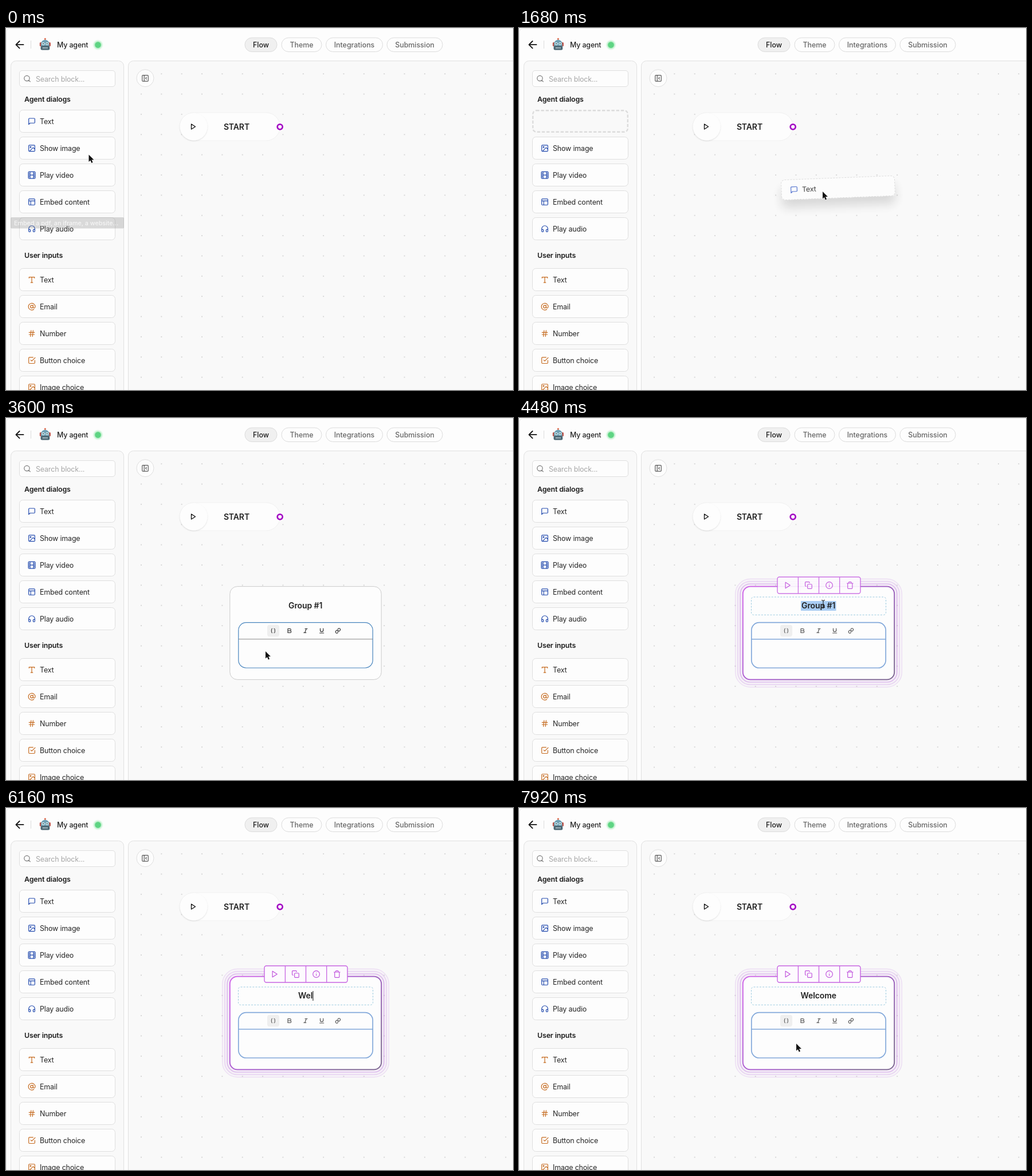
An HTML page that plays this animation: 885x633 px, repeating every 8000 ms.

```html
<!DOCTYPE html>
<html lang="en">
<head>
<meta charset="utf-8">
<title>Flow builder</title>
<style>
html, body { margin: 0; width: 100%; height: 100%; overflow: hidden; background: #fdfdfd; }
svg { display: block; width: 100%; height: 100%; font-family: Inter, "Liberation Sans", sans-serif; }
text { white-space: pre; }
.label { font-size: 12.4px; letter-spacing: -.13px; fill: #252525; }
.head { font-size: 12.4px; letter-spacing: -.13px; font-weight: 600; fill: #1c1c1c; }
.tab { font-size: 12.4px; font-weight: 500; text-anchor: middle; }
.title { font-size: 14px; letter-spacing: -.1px; font-weight: 600; text-anchor: middle; fill: #222; }
.icon { fill: none; stroke-linecap: round; stroke-linejoin: round; }
.panel { fill: #f9f9f9; stroke: #e1e1e1; }
.box { fill: #fdfdfd; stroke: #dfdfdf; }
</style>
</head>
<body>
<svg id="stage" viewBox="0 0 885 633" preserveAspectRatio="xMinYMin meet">
  <defs>
    <pattern id="dots" x="218.3" y="62.4" width="35.35" height="35.37" patternUnits="userSpaceOnUse">
      <circle cx="17.7" cy="17.7" r=".85" fill="#bcbcbc"/>
    </pattern>
    <linearGradient id="edge" x1="0" y1="0" x2="1" y2=".7">
      <stop offset="0" stop-color="#cf5fe8"/>
      <stop offset=".55" stop-color="#a558cc"/>
      <stop offset="1" stop-color="#79628f"/>
    </linearGradient>
    <filter id="lift" x="-20%" y="-60%" width="140%" height="300%">
      <feDropShadow dx="0" dy="14" stdDeviation="9" flood-color="#000" flood-opacity=".15"/>
    </filter>
    <filter id="soft" x="-20%" y="-20%" width="140%" height="140%">
      <feDropShadow dx="0" dy="1" stdDeviation="1" flood-color="#000" flood-opacity=".14"/>
    </filter>
    <filter id="blur" x="-50%" y="-50%" width="200%" height="200%"><feGaussianBlur stdDeviation="1.2"/></filter>
  </defs>

  <rect width="885" height="633" fill="#fdfdfd"/>
  <rect x=".5" y=".5" width="900" height="650" rx="7" fill="none" stroke="#ebebeb"/>

  <g id="header">
    <path class="icon" d="M30.5 29.2H17.5M23.6 23l-6.2 6.2 6.2 6.2" stroke="#111" stroke-width="1.8"/>
    <path d="M43.5 22v14" stroke="#dedede"/>
    <g id="robot">
      <path d="M68.3 21v-2" stroke="#77858e" stroke-width="1.5"/>
      <circle cx="68.3" cy="19" r="1.6" fill="#e26a4c"/>
      <rect x="58.8" y="25" width="3.4" height="7" rx="1.5" fill="#bf5148"/>
      <rect x="74.5" y="25" width="3.4" height="7" rx="1.5" fill="#bf5148"/>
      <path d="M61 28a7.3 7.3 0 0 1 14.6 0v6H61z" fill="#6f9fb3"/>
      <rect x="60.5" y="31" width="15.7" height="7.5" rx="2.5" fill="#4b6774"/>
      <circle cx="65" cy="27.5" r="2.5" fill="#d8f1f5"/>
      <circle cx="71.7" cy="27.5" r="2.5" fill="#d8f1f5"/>
      <circle cx="65" cy="27.5" r="1.1" fill="#27424d"/>
      <circle cx="71.7" cy="27.5" r="1.1" fill="#27424d"/>
      <path d="M64 34.8h8.6" stroke="#c9d8dd" stroke-width="2" stroke-dasharray="1.6 .7"/>
    </g>
    <text class="label" x="89" y="33.8" font-weight="500">My agent</text>
    <circle cx="160.5" cy="29.6" r="7.6" fill="#b9f0c8" filter="url(#blur)"/>
    <circle cx="160.5" cy="29.6" r="5.3" fill="#5ed483"/>
  </g>

  <rect class="panel" x="213.5" y="57.5" width="700" height="620" rx="9"/>
  <rect x="218.3" y="62.4" width="667" height="571" fill="url(#dots)"/>
  <circle class="box" cx="243" cy="87.7" r="15"/>
  <g id="start">
    <rect x="303.5" y="148" width="175" height="49" rx="24.5" fill="#fdfdfd" stroke="#f1f1f1"/>
    <circle cx="327.5" cy="172.5" r="24" fill="#fdfdfd" filter="url(#soft)"/>
    <text class="title" x="402.5" y="177.9">START</text>
    <circle cx="478.2" cy="172.8" r="7.3" fill="#fdfdfd"/>
    <circle cx="478.2" cy="172.8" r="4.5" fill="#fdfdfd" stroke="#a410c4" stroke-width="2.8"/>
  </g>

  <rect class="panel" x="8.5" y="57.5" width="197" height="620" rx="9"/>
  <rect class="box" x="23.5" y="74.5" width="167" height="28" rx="4.5"/>
  <text class="label" x="52" y="93.6" style="fill:#a6a6a6">Search block...</text>
  <text class="head" x="32" y="129.3">Agent dialogs</text>
  <text class="head" x="32" y="402.2">User inputs</text>
  <g id="blocks"></g>
  <rect id="slot" x="24.2" y="144.2" width="165.6" height="37.6" rx="6" fill="#f9f9f9" stroke="#dcdcdc" stroke-width="2.4" stroke-dasharray="5.4 2.8"/>
  <g id="tip">
    <rect x="8" y="331" width="198" height="19.5" rx="2" fill="#777" opacity=".27"/>
    <text x="14" y="345" font-size="10.7" font-weight="500" fill="#fff" opacity=".75">Embed a pdf, an iframe, a website...</text>
  </g>

  <g id="card">
    <g id="rings" fill="none"></g>
    <rect id="frame" x="390.8" y="294.6" width="264.4" height="162.8" rx="13" fill="#fdfdfd"/>
    <rect id="field" x="405.5" y="313" width="235" height="31.3" rx="4" fill="none" stroke="#9ccbe0" stroke-dasharray="3 2.2"/>
    <rect id="pick" x="492" y="320" width="61.5" height="17" fill="#a9cdf4"/>
    <text id="name" class="title" x="522.7" y="333.3"></text>
    <path id="caret" stroke="#222" stroke-width="1.1"/>
    <rect id="editor" x="405.8" y="357.6" width="234.4" height="79.4" rx="13.5" fill="#fdfdfd"/>
    <path id="rule" d="M406 386.7H640"/>
    <rect x="456" y="361.8" width="21" height="20.4" rx="4" fill="#efefef"/>
    <g id="format"></g>
    <g id="tools">
      <rect x="451" y="276" width="145" height="29" rx="3.5" fill="#fdfafe" stroke="#c765e2" stroke-width="1.4"/>
      <path d="M487.4 276v29M523.5 276v29M559.7 276v29" stroke="#c765e2" stroke-width="1.3"/>
    </g>
  </g>

  <g id="ghost" opacity=".88">
    <g transform="rotate(-2.2 122 160.5)">
      <rect x="23" y="143" width="198" height="35" rx="6" fill="#fdfdfd" filter="url(#lift)"/>
      <rect x="23" y="143" width="198" height="35" rx="6" fill="none" stroke="#dadada" stroke-dasharray="3 2"/>
      <text class="label" x="59" y="165.2">Text</text>
    </g>
  </g>

  <path id="arrow" d="M0 0V12.6L2.9 9.9 4.8 14.4 7 13.5 5.1 9.1H9Z" fill="#111" stroke="#fff" stroke-width="1.1" paint-order="stroke"/>
  <path id="beam" d="M-3-6.5q3 0 3 2.2V4.3q0 2.2-3 2.2M3-6.5q-3 0-3 2.2M0 4.3q0 2.2 3 2.2M-1.5 2.5h3" fill="none" stroke="#222" stroke-width="1.1"/>
</svg>
<script>
const $ = id => document.getElementById(id);
const LOOP = 8000, STEP = 80;

const square = 'M5 3h14a2 2 0 0 1 2 2v14a2 2 0 0 1-2 2H5a2 2 0 0 1-2-2V5a2 2 0 0 1 2-2z';
const ring = (x, y, r) => `M${x - r} ${y}a${r} ${r} 0 1 0 ${2 * r} 0a${r} ${r} 0 1 0 ${-2 * r} 0`;
const ICONS = {
  message: 'M21 15a2 2 0 0 1-2 2H7l-4 4V5a2 2 0 0 1 2-2h14a2 2 0 0 1 2 2z',
  image: square + ring(8.5, 8.5, 1.5) + 'M21 15l-5-5L5 21',
  film: 'M4 2h16a2 2 0 0 1 2 2v16a2 2 0 0 1-2 2H4a2 2 0 0 1-2-2V4a2 2 0 0 1 2-2zM7 2v20M17 2v20M2 12h20M2 7h5M2 17h5M17 17h5M17 7h5',
  layout: square + 'M3 9h18M9 21V9',
  audio: 'M3 18v-6a9 9 0 0 1 18 0v6M21 19a2 2 0 0 1-2 2h-1a2 2 0 0 1-2-2v-3a2 2 0 0 1 2-2h3zM3 19a2 2 0 0 0 2 2h1a2 2 0 0 0 2-2v-3a2 2 0 0 0-2-2H3z',
  type: 'M4 7V4h16v3M9 20h6M12 4v16',
  at: ring(12, 12, 4) + 'M16 8v5a3 3 0 0 0 6 0v-1a10 10 0 1 0-3.9 7.9',
  hash: 'M4 9h16M4 15h16M10 3L8 21M16 3l-2 18',
  check: 'M9 11l3 3L22 4M21 12v7a2 2 0 0 1-2 2H5a2 2 0 0 1-2-2V5a2 2 0 0 1 2-2h11',
  search: ring(11, 11, 8) + 'M21 21l-4.3-4.3',
  collapse: square + 'M9 3v18M16 9l-3 3 3 3',
  play: 'M5 3l14 9-14 9z',
  copy: 'M11 9h9a2 2 0 0 1 2 2v9a2 2 0 0 1-2 2h-9a2 2 0 0 1-2-2v-9a2 2 0 0 1 2-2zM5 15H4a2 2 0 0 1-2-2V4a2 2 0 0 1 2-2h9a2 2 0 0 1 2 2v1',
  info: ring(12, 12, 10) + 'M12 16v-4M12 8h.01',
  trash: 'M3 6h18M19 6v14a2 2 0 0 1-2 2H7a2 2 0 0 1-2-2V6M8 6V4a2 2 0 0 1 2-2h4a2 2 0 0 1 2 2v2',
  braces: 'M8 3H7a2 2 0 0 0-2 2v5a2 2 0 0 1-2 2 2 2 0 0 1 2 2v5a2 2 0 0 0 2 2h1M16 21h1a2 2 0 0 0 2-2v-5a2 2 0 0 1 2-2 2 2 0 0 1-2-2V5a2 2 0 0 0-2-2h-1',
  bold: 'M6 4h8a4 4 0 0 1 0 8H6zM6 12h9a4 4 0 0 1 0 8H6z',
  italic: 'M19 4h-9M14 20H5M15 4L9 20',
  underline: 'M6 3v7a6 6 0 0 0 12 0V3M4 21h16',
  link: 'M10 13a5 5 0 0 0 7.5.5l3-3a5 5 0 0 0-7-7l-1.7 1.7M14 11a5 5 0 0 0-7.5-.5l-3 3a5 5 0 0 0 7 7l1.7-1.7'
};

const add = (parent, markup) => parent.insertAdjacentHTML('beforeend', markup);
const icon = (name, x, y, size, color, weight = 2) =>
  `<path class="icon" d="${ICONS[name]}" stroke="${color}" stroke-width="${weight}" transform="translate(${x - size / 2} ${y - size / 2}) scale(${size / 24})"/>`;

function addBlocks(top, color, rows) {
  rows.forEach(([name, label], i) => {
    const y = top + i * 46.95;
    add($('blocks'), `<g><rect class="box" x="23.5" y="${Math.round(y - 20) + .5}" width="167" height="39" rx="6"/>
      ${icon(name, 45, y + .3, 14.2, color)}<text class="label" x="59" y="${y + 4.7}">${label}</text></g>`);
  });
}

const BLUE = '#2149ad', ORANGE = '#c56a1e', PINK = '#bf4fdc';
addBlocks(163, BLUE, [['message', 'Text'], ['image', 'Show image'], ['film', 'Play video'],
  ['layout', 'Embed content'], ['audio', 'Play audio']]);
addBlocks(440, ORANGE, [['type', 'Text'], ['at', 'Email'], ['hash', 'Number'],
  ['check', 'Button choice'], ['image', 'Image choice']]);

[['Flow', 445, 56], ['Theme', 516, 70], ['Integrations', 608, 99], ['Submission', 713.5, 97]].forEach(([label, x, w], i) =>
  add($('header'), `<rect x="${x - w / 2}" y="17" width="${w}" height="24.5" rx="12.2" fill="${i ? '#fdfdfd' : '#f0f0f0'}" stroke="#dcdcdc"/>
    <text class="tab" x="${x}" y="33.8" fill="${i ? '#666' : '#1c1c1c'}">${label}</text>`));

add($('stage').querySelector('#start'), icon('play', 327, 172.5, 12, '#111', 2.6) + icon('collapse', 243, 87.8, 14, '#555'));
add($('blocks'), icon('search', 37, 88.6, 14, '#777'));
add($('ghost').firstElementChild, icon('message', 45, 161, 14.2, '#3a5fc8'));
['braces', 'bold', 'italic', 'underline', 'link'].forEach((name, i) =>
  add($('format'), icon(name, 466.4 + i * 28.25, 372, i ? 10.6 : 9.6, 'currentColor', 2.5)));
['play', 'copy', 'info', 'trash'].forEach((name, i) =>
  add($('tools'), icon(name, 469.2 + i * 36.2, 290.5, 14, PINK)));
[[4.6, .5], [9, .28], [13.2, .2]].forEach(([d, alpha]) =>
  add($('rings'), `<rect x="${390.8 - d}" y="${294.6 - d}" width="${264.4 + 2 * d}" height="${162.8 + 2 * d}" rx="${13 + d}" stroke="#b56bdc" stroke-opacity="${alpha}" stroke-width="1.2" fill="#b56bdc" fill-opacity=".035"/>`));

// Key points: time, x, y
const POINTER = [[0, 144.5, 221.5], [480, 104, 162], [720, 104, 162], [880, 121, 161], [1680, 530, 286],
  [2160, 464, 316], [2720, 450, 390], [3200, 453, 408], [3680, 453, 408], [4160, 531, 325],
  [7200, 531, 325], [7840, 484, 412], [8000, 484, 412]];
const DRAG = [[720, 0, 0], [880, 18, 1.7], [1680, 435, 119], [2160, 368, 152]];
const GRAB = 720, DROP = 2240, FOCUS = 4240;
const KEYS = [5680, 5840, 6080, 6400, 6560, 6720, 6880];

function along(keys, t) {
  let i = 1;
  while (i < keys.length - 1 && t > keys[i][0]) i++;
  const [t0, x0, y0] = keys[i - 1], [t1, x1, y1] = keys[i];
  const p = Math.min(1, Math.max(0, (t - t0) / (t1 - t0)));
  const e = p * p * (3 - 2 * p);
  return [x0 + (x1 - x0) * e, y0 + (y1 - y0) * e];
}

const show = (el, on) => el.setAttribute('display', on ? 'inline' : 'none');
const place = (el, [x, y]) => el.setAttribute('transform', `translate(${x} ${y})`);
const paint = (el, color, width) => {
  el.setAttribute('stroke', color);
  el.setAttribute('stroke-width', width);
};

function draw(t) {
  const dragging = t >= GRAB && t < DROP;
  const focused = t >= FOCUS;
  const typed = KEYS.filter(k => t >= k).length;
  const pos = along(POINTER, t);

  $('tip').setAttribute('opacity', Math.max(0, 1 - t / 160));
  show($('blocks').firstElementChild, !dragging);
  show($('slot'), dragging);
  show($('ghost'), dragging);
  place($('ghost'), along(DRAG, t));

  show($('card'), t >= DROP);
  ['rings', 'field', 'tools'].forEach(id => show($(id), focused));
  paint($('frame'), focused ? 'url(#edge)' : '#cbcbcb', focused ? 1.8 : 1);
  paint($('editor'), focused ? '#82a8da' : '#4784bd', focused ? 1.7 : 1.2);
  paint($('rule'), focused ? '#82a8da' : '#8a8a8a', focused ? 1.4 : 1);
  $('format').setAttribute('color', focused ? '#4a4a4a' : '#252525');

  const p = Math.min(1, Math.max(0, (t - FOCUS) / 480));
  place($('tools'), [0, 8 * (1 - p) ** 2]);
  $('tools').setAttribute('opacity', Math.min(1, .1 + p * 1.6));

  const name = $('name');
  name.textContent = typed ? 'Welcome'.slice(0, typed) : 'Group #1';
  show($('pick'), focused && !typed);
  const typing = typed > 0 && t < 7200;
  show($('caret'), typing);
  if (typing) $('caret').setAttribute('d', `M${522.7 + name.getComputedTextLength() / 2 + .6} 320v17`);

  const overName = pos[1] > 313 && pos[1] < 345 && t > 3680;
  show($('beam'), overName && (!typed || t >= 7200));
  show($('arrow'), !overName);
  place($('beam'), pos);
  place($('arrow'), pos);
}

const begin = performance.now();
function tick() {
  const t = (performance.now() - begin) % LOOP;
  draw(Math.floor(t / STEP) * STEP);
  requestAnimationFrame(tick);
}
tick();
</script>
</body>
</html>
```
